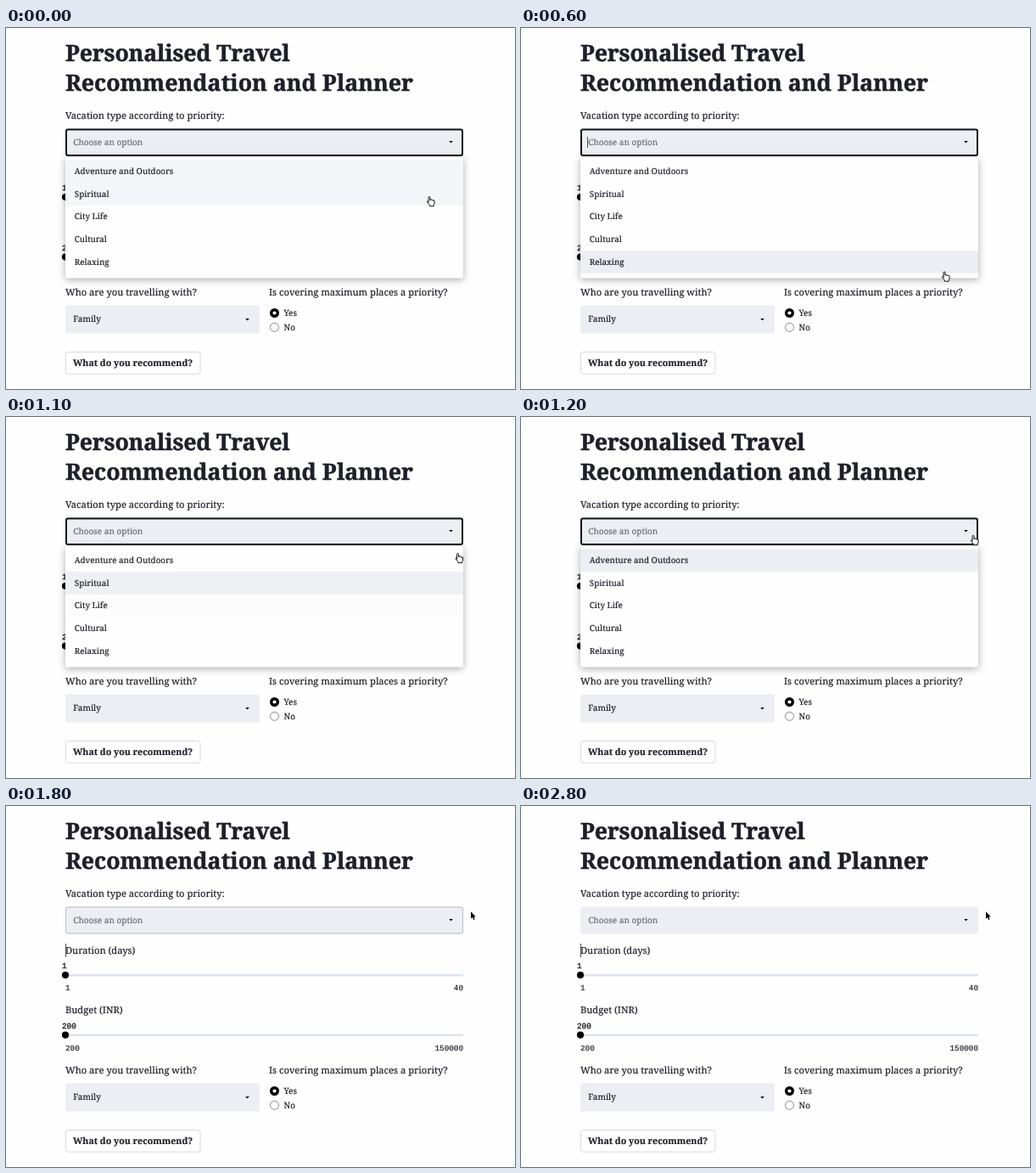
Animation, 600 px wide and 425 px high, one loop 2900 ms. Source, as an HTML page:

```html
<!DOCTYPE html>
<html lang="en">
<head>
<meta charset="utf-8">
<title>Travel planner form</title>
<style>
  html, body { margin: 0; width: 100%; height: 100%; overflow: hidden; background: #fefefe; }
  svg { display: block; width: 100vw; height: 100vh; }
  text {
    font: 10px "Noto Serif", serif; fill: #1f2029; stroke: #1f2029; stroke-width: .18px;
    text-rendering: geometricPrecision; white-space: pre;
  }
  .title { font-size: 26.7px; font-weight: 700; fill: #1e1f29; stroke-width: .5px; }
  .tight { letter-spacing: -.2px; }
  .label { font-size: 11.15px; }
  .option { font-size: 9.85px; }
  .hint { fill: #6d6f77; stroke: #6d6f77; }
  .button { font-size: 10.63px; font-weight: 700; }
  .mono { font: 9.3px "Liberation Mono", monospace; }
  .value { stroke-width: .35px; }
  .end { text-anchor: end; }
  .field { fill: #eceef3; }
  .track { fill: #dde4ec; }
  .caret { fill: #3a3b45; }
  #menu { filter: drop-shadow(0 2px 4px rgba(0, 0, 0, .32)); }
</style>
</head>
<body>
<svg viewBox="0 0 600 425">
  <rect width="600" height="425" fill="#fefefe"/>

  <text class="title tight" x="70" y="38.9">Personalised Travel</text>
  <text class="title" x="70" y="73.6">Recommendation and Planner</text>

  <text class="label" x="70" y="107">Vacation type according to priority:</text>
  <rect class="field" x="70" y="118.5" width="469" height="32" rx="2.5"/>
  <text class="hint" x="79.3" y="137.6">Choose an option</text>
  <path d="M522.2 133.1h4.6l-2.3 2.5z"/>
  <rect id="focus" x="71" y="119.5" width="467" height="30.5" rx="2" fill="none" stroke="#111216" stroke-width="2"/>
  <rect id="blur" x="70.5" y="119" width="468" height="31" rx="2" fill="none" stroke="#bbbec5"/>
  <rect id="inputCaret" class="caret" x="78" y="128" width=".9" height="13"/>

  <text class="label" x="70" y="173.8">Duration (days)</text>
  <rect id="textCaret" class="caret" x="70" y="162" width=".9" height="16"/>
  <text class="mono value" x="66" y="191.3">1</text>
  <rect class="track" x="70" y="197.8" width="469" height="2.6" rx="1"/>
  <circle cx="70" cy="199" r="4.1"/>
  <text class="mono" x="70" y="217.4">1</text>
  <text class="mono end" x="539" y="217.4">40</text>

  <text class="label" x="70" y="244.4">Budget (INR)</text>
  <text class="mono value" x="66" y="261.9">200</text>
  <rect class="track" x="70" y="268.4" width="469" height="2.6" rx="1"/>
  <circle cx="70" cy="269.6" r="4.1"/>
  <text class="mono" x="70" y="288">200</text>
  <text class="mono end" x="539" y="288">150000</text>

  <text class="label" x="70" y="315">Who are you travelling with?</text>
  <rect class="field" x="70" y="326.5" width="229" height="33" rx="2.5"/>
  <text x="79.3" y="346.2">Family</text>
  <path d="M282.2 342.1h4.6l-2.3 2.5z"/>

  <text class="label" x="310" y="315">Is covering maximum places a priority?</text>
  <circle cx="316.5" cy="335.5" r="5.5"/>
  <circle cx="316.5" cy="335.5" r="2.1" fill="#fff"/>
  <text x="327.5" y="339">Yes</text>
  <circle cx="316.5" cy="352.3" r="5" fill="#fff" stroke="#85878e"/>
  <text x="327.5" y="356">No</text>

  <rect x="70.5" y="381.5" width="158.5" height="25.7" rx="2.5" fill="#fff" stroke="#d9dade"/>
  <text class="button" x="79" y="397.8">What do you recommend?</text>

  <g id="menu"><rect x="70" y="152" width="469" height="142.5" rx="2" fill="#fefefe"/></g>
  <g id="options"></g>

  <path id="hand" fill="#fff" stroke="#111" stroke-width="1" stroke-linejoin="round"
    d="M-2.9 1.6V-4.6a.95.95 0 0 1 1.9 0V-1.4a.9.9 0 0 1 1.8 0v.4a.9.9 0 0 1 1.7.1v.4a.8.8 0 0 1 1.6.2V2.4L3.2 4.2V5.7H-1.6V4.4L-4.6.9a1 1 0 0 1 1.7-.9"/>
  <path id="arrow" stroke="#fff" stroke-width=".8" paint-order="stroke"
    d="M0 0V8.5L1.9 6.8 3.2 9.8 4.6 9.2 3.3 6.3H5.7Z"/>
</svg>

<script>
const LOOP = 2900, STEP = 100, ROW = 26.65;
const $ = id => document.getElementById(id);
const NS = "http://www.w3.org/2000/svg";

function add(parent, tag, attrs, text = "") {
  const el = document.createElementNS(NS, tag);
  for (const key in attrs) el.setAttribute(key, attrs[key]);
  el.textContent = text;
  return parent.appendChild(el);
}

const options = ["Adventure and Outdoors", "Spiritual", "City Life", "Cultural", "Relaxing"];
const rows = options.map((name, i) => {
  const y = 155.4 + i * ROW;
  const row = add($("options"), "rect", { class: "field", x: 70, y, width: 469, height: ROW });
  add($("options"), "text", { class: "option", x: 80.8, y: y + 16.6 }, name);
  return row;
});

// Keys are [ms, value, ...], linear in between.
const handPath = [[0, 501, 204], [300, 499, 269.5], [500, 500, 292.5], [600, 501, 292.5],
  [800, 505, 249.5], [900, 511, 222], [1100, 534.5, 166], [1200, 535, 145]];
const arrowPath = [[1300, 548.5, 129], [1400, 548, 124.3]];
// Row under highlight; fractions are crossfades between neighbours.
const hoverPath = [[0, .5], [100, 1.2], [300, 3], [500, 4], [700, 4], [800, 3.5],
  [900, 2.9], [1000, 2], [1100, 1.12], [1200, 0]];

function at(path, t) {
  const i = path.findIndex(key => key[0] >= t);
  if (i < 0) return path[path.length - 1].slice(1);
  if (i === 0) return path[0].slice(1);
  const a = path[i - 1], b = path[i], k = (t - a[0]) / (b[0] - a[0]);
  return a.slice(1).map((v, j) => v + (b[j + 1] - v) * k);
}

const show = (id, on) => $(id).setAttribute("visibility", on ? "visible" : "hidden");
const place = (id, path, t) => $(id).setAttribute("transform", `translate(${at(path, t)})`);

function draw() {
  const t = Math.floor(performance.now() % LOOP / STEP) * STEP;
  const open = t < 1800;

  for (const id of ["menu", "options", "focus"]) show(id, open);
  show("blur", t === 1800);
  show("inputCaret", open && (t + 500) % 1000 < 500);
  show("textCaret", !open && (t - 1800) % 1000 < 500);

  const [hover] = at(hoverPath, t);
  rows.forEach((row, i) => row.setAttribute("opacity", Math.max(0, 1 - Math.abs(hover - i))));

  show("hand", t < 1300);
  show("arrow", t >= 1300);
  place("hand", handPath, t);
  place("arrow", arrowPath, t);
  requestAnimationFrame(draw);
}
draw();
</script>
</body>
</html>
```
